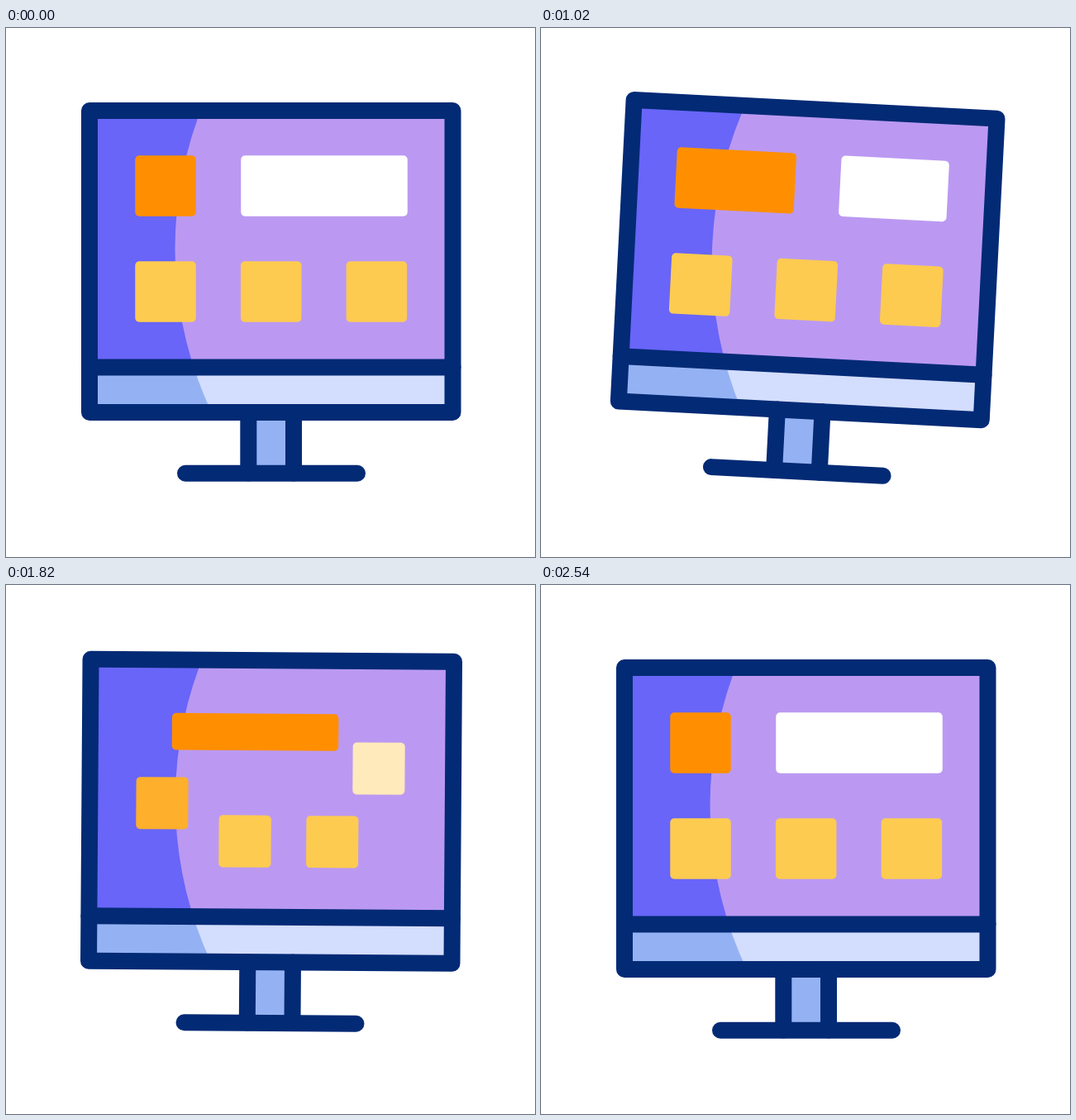
These frames come from a looping animation (640x640 px, 3.32 s). An HTML page with a canvas:

```html
<!DOCTYPE html>
<html lang="en">
<head>
<meta charset="utf-8">
<title>Monitor</title>
<style>
  html, body { margin: 0; width: 100%; height: 100%; overflow: hidden; background: #fff; }
  canvas { display: block; width: 640px; height: 640px; }
</style>
</head>
<body>
<canvas id="stage" width="640" height="640"></canvas>
<script>
const ctx = document.getElementById('stage').getContext('2d');
const LOOP = 3320;
const SHUFFLE = 1600;
const NAVY = '#032a75';
const ORANGE = [255, 143, 0], YELLOW = [253, 203, 80], WHITE = [255, 255, 255];
const COLS = [193, 320.7, 448.4], ROWS = [191, 319];
const SIDE = 73.5, STEP = 128;

// Keys are [time, value]; each span is eased in and out.
const LIFT = [[260, 0], [860, -10], [1260, 12.5], [1540, 12.5], [1920, -13], [2020, -13], [2320, 4], [2450, 0]];
const TILT = [[735, 0], [1045, 3], [1063, 3], [1610, -1], [1942, 1], [2000, 1], [2440, 0]];

const clamp = v => Math.max(0, Math.min(1, v));
const smooth = u => u * u * (3 - 2 * u);
const lerp = (a, b, p) => a + (b - a) * p;
const rgb = c => `rgb(${c.map(Math.round).join(',')})`;
const mix = (a, b, p) => rgb(a.map((v, i) => lerp(v, b[i], clamp(p))));

function track(keys, t) {
  if (t <= keys[0][0]) return keys[0][1];
  for (let i = 1; i < keys.length; i++) {
    const [t0, v0] = keys[i - 1], [t1, v1] = keys[i];
    if (t < t1) return lerp(v0, v1, smooth((t - t0) / (t1 - t0)));
  }
  return keys[keys.length - 1][1];
}

const shuffle = (t, power, length) => smooth(Math.pow(clamp((t - SHUFFLE) / length), power));

function rect(x, y, w, h, color) {
  ctx.fillStyle = color;
  ctx.fillRect(x, y, w, h);
}

function tile(cx, cy, w, h, color) {
  ctx.fillStyle = color;
  ctx.beginPath();
  ctx.roundRect(cx - w / 2, cy - h / 2, w, h, Math.min(5, h / 2));
  ctx.fill();
}

function line(x1, y1, x2, y2) {
  ctx.beginPath();
  ctx.moveTo(x1, y1);
  ctx.lineTo(x2, y2);
  ctx.stroke();
}

function drawMonitor() {
  rect(293, 465, 55, 72, '#94b2f3');
  rect(101, 100, 440, 310, '#6865f8');
  rect(101, 410, 440, 55, '#94b2f3');

  ctx.save();
  ctx.beginPath();
  ctx.arc(670.5, 267, 466, 0, Math.PI * 2);
  ctx.clip();
  rect(101, 100, 440, 310, '#bb99f2');
  rect(101, 410, 440, 55, '#d3ddfd');
  ctx.restore();

  ctx.strokeStyle = NAVY;
  ctx.lineWidth = 20;
  ctx.lineJoin = ctx.lineCap = 'round';
  ctx.strokeRect(101, 100, 439.5, 365);
  line(101, 410.5, 540.5, 410.5);
  line(293.3, 465, 293.3, 538.5);
  line(348, 465, 348, 538.5);
  line(217, 538.7, 425, 538.7);
}

function drawResize(t) {
  const grow = STEP * smooth(clamp((t - 733) / 537));
  tile(COLS[0] + grow / 2, ROWS[0], SIDE + grow, SIDE, rgb(ORANGE));
  tile(385 + grow / 2, ROWS[0], SIDE + STEP - grow, SIDE, rgb(WHITE));
  for (const x of COLS) tile(x, ROWS[1], SIDE, SIDE, rgb(YELLOW));
}

// Every tile moves one place clockwise while the wide one flips over.
function drawShuffle(t) {
  const move = (p, [x0, y0], [x1, y1], from, to, bulge) => {
    const squeeze = 1 - Math.pow(2 * p - 1, 6);
    const side = SIDE - 10.5 * squeeze;
    tile(lerp(x0, x1, p) + bulge * squeeze, lerp(y0, y1, p), side, side, mix(from, to, p * 1.3));
  };
  const [left, middle, right] = COLS, [top, bottom] = ROWS;

  const slide = shuffle(t, 0.82, 692);
  const flip = Math.cos(Math.PI * shuffle(t, 0.84, 751));
  tile(lerp(257, 385, slide), top - 5 * Math.sin(Math.PI * slide), SIDE + STEP,
    SIDE * Math.abs(flip), rgb(flip > 0 ? ORANGE : WHITE));

  move(shuffle(t, 0.93, 651), [right, top], [right, bottom], WHITE, YELLOW, 2);
  move(shuffle(t, 0.74, 657), [right, bottom], [middle, bottom], YELLOW, YELLOW, 0);
  move(shuffle(t, 0.96, 713), [middle, bottom], [left, bottom], YELLOW, YELLOW, 0);
  move(shuffle(t, 0.83, 661), [left, bottom], [left, top], YELLOW, ORANGE, -4.4);
}

function frame() {
  const t = performance.now() % LOOP;
  rect(0, 0, 640, 640, '#fff');
  ctx.save();
  ctx.translate(320, 320 + track(LIFT, t));
  ctx.rotate(track(TILT, t) * Math.PI / 180);
  ctx.translate(-320, -320);
  drawMonitor();
  if (t < SHUFFLE) drawResize(t);
  else drawShuffle(t);
  ctx.restore();
  requestAnimationFrame(frame);
}
frame();
</script>
</body>
</html>
```
